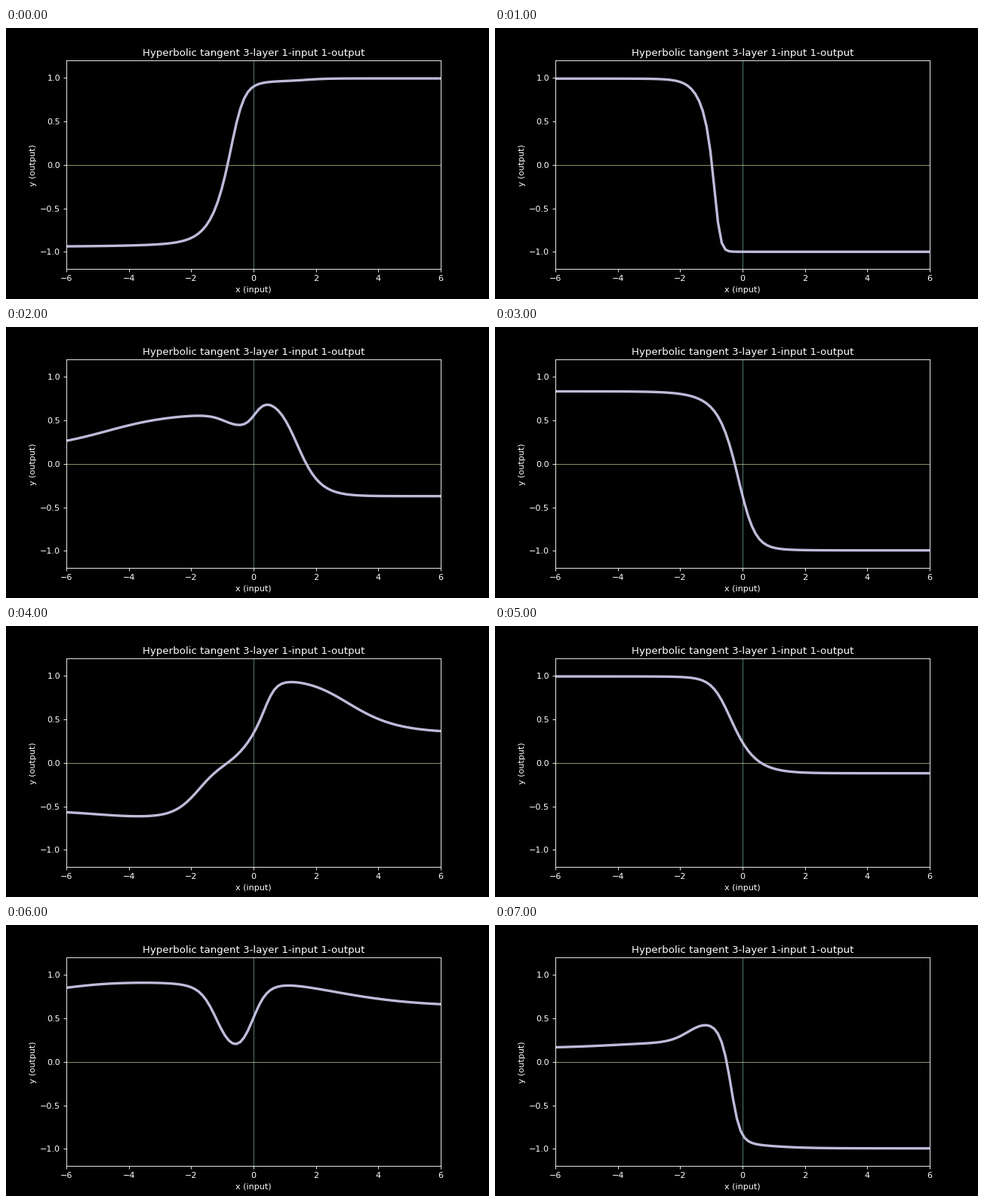
A matplotlib script for the animation above (8 s loop, 640x360 px).

```python
import numpy as np
import matplotlib.pyplot as plt
from matplotlib.animation import FuncAnimation

plt.style.use("dark_background")

DPI = 80
X = np.linspace(-6, 6, 100)


def net(bias, *units):
    """One hidden layer of tanh units, each (weight, centre, width), and a tanh output."""
    total = bias + sum(w * np.tanh((X - c) / s) for w, c, s in units)
    return np.tanh(total)


CURVES = (
    net(.58, (.82, -1.25, 1), (.9, -.4, .6), (.15, -3, 2.5), (.45, 2, .7)),
    net(-.94, (-1.3, -1.7, .9), (-2.4, -.57, .42)),
    net(-.11, (-.75, 1.25, .85), (.32, .1, .35), (-.1, -.95, .5), (.25, -4.5, 2.2)),
    net(-.9, (-2.1, .3, 1.2)),
    net(-.13, (-1, 2, 1.8), (.8, .6, .45), (.35, -.1, .75), (.4, -1.85, .85),
        (-.06, -5, 1.5)),
    net(1.39, (-1.51, -1, 1)),
    net(.9, (-.75, .9, 3), (.95, .15, .62), (-.65, -1.38, .65), (.3, -5.6, 1.7)),
    net(-1.42, (-.7, 1.5, 1.6), (-1.1, -.23, .44), (.18, -1.65, .65), (.04, -4, 2)),
)

fig, ax = plt.subplots(figsize=(640 / DPI, 360 / DPI), dpi=DPI)
ax.set(xlim=(-6, 6), ylim=(-1.2, 1.2), xlabel="x (input)", ylabel="y (output)",
       title="Hyperbolic tangent 3-layer 1-input 1-output")
ax.axvline(0, color="C0", lw=0.5)
ax.axhline(0, color="C1", lw=0.5)
line, = ax.plot(X, CURVES[0], color="C2", lw=3)


def update(k):
    line.set_ydata(CURVES[k])
    return line,


anim = FuncAnimation(fig, update, frames=len(CURVES), interval=1000, repeat=True)
plt.show()
```
